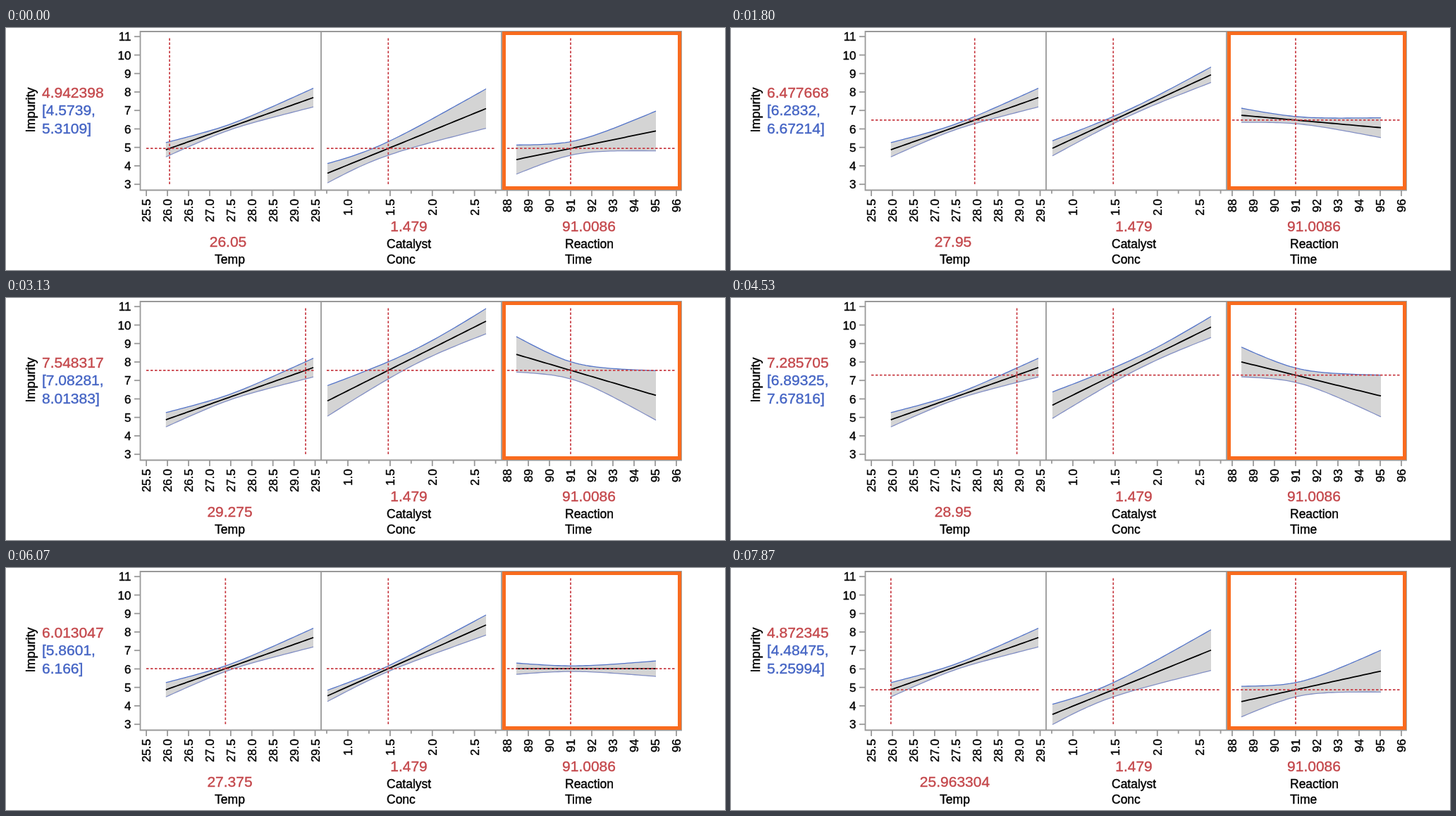
Recreate the animation shown at these times as an HTML page. Size 1020 by 344 pixels, loop 8730 ms.

```html
<!DOCTYPE html>
<html lang="en">
<head>
<meta charset="utf-8">
<title>Prediction profiler</title>
<style>
html, body { margin: 0; width: 100%; height: 100%; overflow: hidden; background: #fff; }
svg { display: block; width: 1020px; height: 344px; font-family: "Liberation Sans", Arial, sans-serif; }
text { stroke-width: 0.4; }
.tick { font-size: 17px; stroke: #000; }
.name { font-size: 17.5px; stroke: #000; }
.num { font-size: 21px; fill: #c4484c; stroke: #c4484c; }
.range { font-size: 21px; fill: #4464c4; stroke: #4464c4; }
.axis { fill: none; stroke: #999; stroke-width: 1.8; }
.band { fill: #d4d4d4; }
.line { fill: none; stroke: #000; stroke-width: 1.8; }
.upper { fill: none; stroke: #5474c8; stroke-width: 1.3; }
.lower { fill: none; stroke: #8490c4; stroke-width: 1.3; }
.hair { fill: none; stroke: #c83c44; stroke-width: 1.7; stroke-dasharray: 3.5 2.5; }
</style>
</head>
<body>
<svg id="stage" viewBox="0 0 1020 344"></svg>
<script>
const LOOP = 8730, TICK = 1000 / 15;
const MIN = 25.963304, MAX = 29.458716;
const UNIT = 26.25;

// [tick, temperature] pairs of the drag
const DRAG = [
  [0, 26.05], [1, 26.1], [3, 26.1], [5, 26.2], [13, 26.9], [27, 27.95],
  [29, 28.1], [30, 28.1], [47, 29.275], [49, 29.4], [50, 29.4], [51, MAX],
  [58, MAX], [61, 29.35], [68, 28.95], [91, 27.375], [107, 26.5],
  [108, 26.5], [114, 26.1], [118, MIN], [131, MIN]
];

const stage = document.getElementById('stage');

function add(tag, attrs, text) {
  const el = document.createElementNS('http://www.w3.org/2000/svg', tag);
  for (const k in attrs) el.setAttribute(k, attrs[k]);
  if (text !== undefined) el.textContent = text;
  stage.appendChild(el);
  return el;
}
const path = (cls, d = '') => add('path', { class: cls, d });
const label = (cls, x, y, text, anchor = 'start') =>
  add('text', { class: cls, x, y, 'text-anchor': anchor }, text);
const turned = (cls, x, y, text, anchor) =>
  add('text', { class: cls, transform: `translate(${x} ${y}) rotate(-90)`, 'text-anchor': anchor }, text);

const yOf = v => 222.2 - UNIT * (v - 3);
const tempX = t => 199.1 + 59.85 * (t - 25.5);

// Fitted model: mean and variance at a given temperature
const mean = t => 4.9423983 + 0.8080369 * (t - 26.05);
const quad = (a, p, q) => t => { const u = t - 27.375; return a + p * u + q * u * u; };
const variance = quad(0.0233942, -0.0081767, 0.05785085);

// Variances (in px squared) at both ends, slope in px per px
const panes = [
  { x0: 226.8, x1: 436, left: 199 },
  { x0: 456, x1: 681, left: 455, cx: 542.3,
    slope: t => -0.4087 - 0.0294 * (t - 26.05),
    v0: quad(64, 32.9, 96), v1: quad(203, -232.2, 155.7) },
  { x0: 724, x1: 922, left: 711, cx: 801,
    slope: t => 0.155 * (t - 27.375),
    v0: quad(64, -38.9, 179.2), v1: quad(121, -58.7, 341.4) }
];

function profile(p, t) {
  if (!p.cx) return x => {
    const at = 25.5 + (x - 199.1) / 59.85;
    return [yOf(mean(at)), UNIT * Math.sqrt(variance(at))];
  };
  const vc = UNIT * UNIT * variance(t), yc = yOf(mean(t)), s = p.slope(t);
  const a = p.x0 - p.cx, b = p.x1 - p.cx;
  const ra = (p.v0(t) - vc) / a, rb = (p.v1(t) - vc) / b;
  const c = (rb - ra) / (b - a), k = ra - c * a;
  return x => {
    const d = x - p.cx;
    return [yc + s * d, Math.sqrt(Math.max(0, vc + k * d + c * d * d))];
  };
}

const join = pts => pts.map(([x, y]) => x.toFixed(2) + ' ' + y.toFixed(2)).join('L');

// Layers of each pane
for (const p of panes) {
  for (const cls of ['band', 'upper', 'lower', 'line']) p[cls] = path(cls);
  p.across = path('hair');
  p.down = path('hair');
}

function drawPane(p, t) {
  const at = profile(p, t), top = [], mid = [], low = [];
  for (let i = 0; i <= 40; i++) {
    const x = p.x0 + (p.x1 - p.x0) * i / 40, [y, h] = at(x);
    top.push([x, y - h]);
    mid.push([x, y]);
    low.push([x, y + h]);
  }
  p.band.setAttribute('d', 'M' + join(top.concat(low.slice().reverse())) + 'Z');
  p.upper.setAttribute('d', 'M' + join(top));
  p.lower.setAttribute('d', 'M' + join(low));
  p.line.setAttribute('d', 'M' + join(mid));
  p.across.setAttribute('d', `M${p.left} ${yOf(mean(t)).toFixed(2)}h240`);
  p.down.setAttribute('d', `M${(p.cx || tempX(t)).toFixed(2)} 14.5V223`);
}

// Axes
path('axis', 'M190.5 5H958V230.5H190.5ZM447 5V230.5M703 5V230.5');
for (let v = 3; v <= 11; v++) {
  path('axis', `M182 ${yOf(v)}H190`);
  label('tick', 177.5, yOf(v) + 6.2, v, 'end');
}
function xTicks(x0, step, from, by, count, digits) {
  for (let i = 0; i < count; i++) {
    const x = x0 + step * i;
    path('axis', `M${x} 231V239`);
    turned('tick', x + 6, 243, (from + by * i).toFixed(digits), 'end');
  }
}
xTicks(199.1, 29.93, 25.5, 0.5, 9, 1);
xTicks(485, 59.9, 1, 0.5, 4, 1);
xTicks(711, 30, 88, 1, 9, 0);
for (let i = 0; i < 5; i++) path('axis', `M${455 + 59.9 * i} 231V235.5`);
add('rect', { x: 706.5, y: 7.5, width: 249, height: 220, fill: 'none', stroke: '#f96b1e', 'stroke-width': 5 });

// Text
turned('name', 41, 116.5, 'Impurity', 'middle').style.fontSize = '18px';
const value = label('num', 51, 98.5);
const lower = label('range', 51, 124);
const upper = label('range', 51, 149.5);
const temp = label('num', 317.5, 311, '', 'middle');
label('name', 317.5, 335, 'Temp', 'middle');
label('num', 571.5, 289, '1.479', 'middle');
label('name', 540, 313, 'Catalyst');
label('name', 540, 335, 'Conc');
label('num', 827, 289, '91.0086', 'middle');
label('name', 793, 313, 'Reaction');
label('name', 793, 335, 'Time');

function tempAt(ms) {
  const n = Math.floor((ms + 5) / TICK);
  const i = Math.max(1, DRAG.findIndex(d => d[0] >= n));
  const [a, ta] = DRAG[i - 1], [b, tb] = DRAG[i];
  const raw = n === b ? tb : ta + (tb - ta) * (n - a) / (b - a);
  if (raw <= MIN) return MIN;
  if (raw >= MAX) return MAX;
  return Math.round(raw * 40) / 40;
}

const trim = (v, digits) => String(+v.toFixed(digits));

let shown;
function render(ms) {
  const t = tempAt(ms);
  if (t === shown) return;
  shown = t;
  const m = mean(t), h = Math.sqrt(variance(t));
  for (const p of panes) drawPane(p, t);
  value.textContent = trim(m, 6);
  lower.textContent = '[' + trim(m - h, 5) + ',';
  upper.textContent = trim(m + h, 5) + ']';
  temp.textContent = trim(t, 6);
  temp.setAttribute('x', temp.textContent.length === 5 ? 315 : 317.5);
}

const start = performance.now();
function loop(now) {
  render(Math.max(0, now - start) % LOOP);
  requestAnimationFrame(loop);
}
render(0);
requestAnimationFrame(loop);
</script>
</body>
</html>
```
